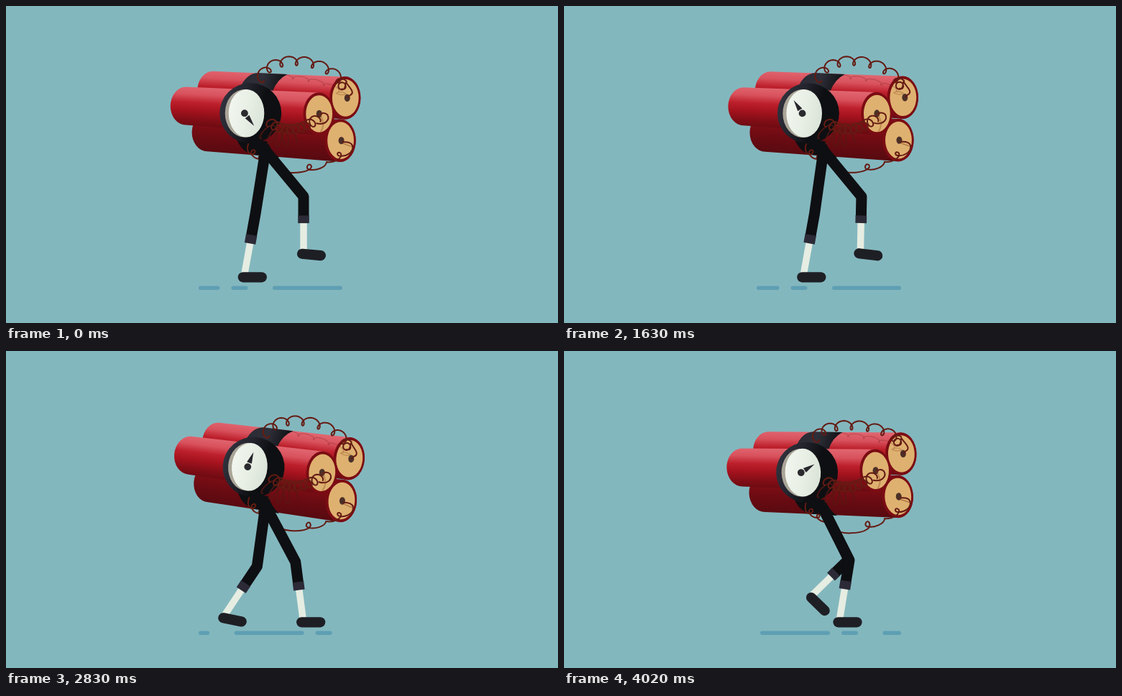
Recreate the animation shown at these times as an HTML page with a canvas. Size 768 by 441 pixels, loop 4120 ms.

```html
<!DOCTYPE html>
<html>
<head>
<meta charset="utf-8">
<title>Walking dynamite</title>
<style>
html, body { margin: 0; width: 100%; height: 100%; overflow: hidden; background: #83b7be; }
canvas { display: block; width: 768px; height: 441px; }
</style>
</head>
<body>
<canvas id="stage" width="768" height="441"></canvas>
<script>
const ctx = document.getElementById('stage').getContext('2d');
const TAU = Math.PI * 2;
const LOOP = 4120;
const WIRE = '#641b13';
const BLACK = '#0e0f12';

// drawing index, walk phase in steps, clock hand in degrees
const TIMING = [
  [0, 0, 143], [4, 1.082, 350], [8, 2.188, 542], [11, 2.988, 687],
  [16, 4.469, 947], [22, 6.158, 1256], [27, 7.575, 1498]
];

// leg phase, knee x y, heel x y, foot angle
const GAIT = [
  [0.29, 403, 293, 414, 377.3, 0],
  [0.469, 401, 296, 392.7, 377.3, 0],
  [0.575, 397, 291, 381.5, 377.3, 0],
  [0.8, 373, 287, 355, 377.3, 0],
  [1, 347, 289, 329.8, 377.3, 0],
  [1.082, 341, 290, 318.5, 377.3, 0],
  [1.158, 338, 291, 311, 377.3, 0],
  [1.188, 336, 292, 307.3, 377.3, 0],
  [1.32, 350, 300, 302, 371, 12],
  [1.469, 377, 301, 324, 357.5, 26],
  [1.575, 396, 290, 344, 343, 44],
  [1.78, 413, 270, 383, 334, 38],
  [2, 414, 265, 412, 344.8, 5],
  [2.082, 409, 275, 416.3, 357, -15],
  [2.158, 405, 282, 417.3, 365.7, -17],
  [2.188, 403, 286, 417.8, 369.5, -17],
  [2.29, 403, 293, 414, 377.3, 0]
];

function sample(keys, at) {
  let i = 1;
  while (i < keys.length - 1 && keys[i][0] < at) i++;
  const a = keys[i - 1], b = keys[i];
  const mix = (at - a[0]) / (b[0] - a[0]);
  return a.slice(1).map((v, j) => v + (b[j + 1] - v) * mix);
}

const startOf = k => 150 * k - 10 * ((k >= 3) + (k >= 9) + (k >= 27));

function stepAt(ms) {
  let k = 27;
  while (startOf(k) > ms) k--;
  return k;
}

function stroke(color, width, points, cap = 'butt') {
  ctx.strokeStyle = color;
  ctx.lineWidth = width;
  ctx.lineCap = cap;
  ctx.lineJoin = 'round';
  ctx.beginPath();
  points.forEach(([x, y]) => ctx.lineTo(x, y));
  ctx.stroke();
}

function curve(d, color = WIRE, width = 2) {
  ctx.strokeStyle = color;
  ctx.lineWidth = width;
  ctx.lineCap = 'round';
  ctx.stroke(new Path2D(d));
}

function oval(x, y, rx, ry, fill) {
  ctx.fillStyle = fill;
  ctx.beginPath();
  ctx.ellipse(x, y, rx, ry, 0, 0, TAU);
  ctx.fill();
}

function linear(x0, y0, x1, y1, ...stops) {
  const g = ctx.createLinearGradient(x0, y0, x1, y1);
  stops.forEach((c, i) => g.addColorStop(i / (stops.length - 1), c));
  return g;
}

// Curly wire: a looping trochoid carried along a cubic curve.
function coil(p, turns, along, across, color = WIRE, width = 2) {
  const points = [];
  const count = Math.ceil(turns * 28);
  for (let i = 0; i <= count; i++) {
    const t = i / count, s = 1 - t;
    const pos = j => s * s * s * p[j] + 3 * s * s * t * p[j + 2] + 3 * s * t * t * p[j + 4] + t * t * t * p[j + 6];
    const vel = j => s * s * (p[j + 2] - p[j]) + 2 * s * t * (p[j + 4] - p[j + 2]) + t * t * (p[j + 6] - p[j + 4]);
    const len = Math.hypot(vel(0), vel(1));
    const dx = vel(0) / len, dy = vel(1) / len;
    const a = t * turns * TAU + Math.PI * 0.9;
    const u = along * Math.sin(a), v = across * Math.cos(a);
    points.push([pos(0) + dx * u + dy * v, pos(1) + dy * u - dx * v]);
  }
  stroke(color, width, points, 'round');
}

function ground(phase) {
  const period = 170.5;
  const first = 371 - (phase % 1) * period;
  for (let n = -2; n < 3; n++) {
    for (const [shift, length] of [[0, 97], [113, 23]]) {
      const x = first + n * period + shift;
      const from = Math.max(268, x), to = Math.min(469, x + length);
      if (to - from > 3) stroke('#5f9fb3', 5.4, [[from + 2.7, 392.2], [to - 2.7, 392.2]], 'round');
    }
  }
}

function leg(phase, bob) {
  const u = (((phase - 0.29) % 2) + 2) % 2 + 0.29;
  const [kx, ky, hx, hy, angle] = sample(GAIT, u);
  const ax = hx + 2, ay = hy - 4;
  const shin = r => [kx + (ax - kx) * r, ky + (ay - ky) * r];
  stroke('#e6ede2', 9.5, [shin(0.47), [ax, ay]]);
  stroke(BLACK, 15, [[361, 201 + bob], [kx, ky], shin(0.37)]);
  stroke('#2b2a36', 15.6, [shin(0.35), shin(0.49)]);
  const turn = angle * TAU / 360;
  stroke('#1e1f25', 14.2, [[hx, hy], [hx + 26 * Math.cos(turn), hy + 26 * Math.sin(turn)]], 'round');
}

function barrel(lx, ly, fx, fy, hole, colors) {
  const mx = (lx + fx) / 2, my = (ly + fy) / 2;
  ctx.fillStyle = linear(mx + 1.5, my - 28, mx - 1.5, my + 28, ...colors);
  ctx.beginPath();
  ctx.ellipse(lx, ly, 21.5, 26.5, 0, Math.PI / 2, Math.PI * 1.5);
  ctx.ellipse(fx, fy, 21.5, 29.5, 0, -Math.PI / 2, Math.PI / 2);
  ctx.fill();
  oval(fx, fy, 21.7, 29.8, '#7b0c13');
  oval(fx + 0.5, fy, 18.4, 25.8, '#dfb170');
  oval(fx + hole, fy, 4, 5.2, '#4a3028');
}

function clock(angle) {
  oval(340, 149.2, 43, 42, linear(300, 130, 378, 158, '#31323d', '#23242d', BLACK, BLACK));
  oval(331.5, 149.3, 27, 33.3, '#aaa598');
  oval(334.3, 149.3, 24.8, 33.3, linear(310, 140, 359, 150, '#f1f6ee', '#e8efe5', '#dbe4d9'));
  oval(331.7, 149.3, 4.9, 4.9, '#2a2a2f');
  ctx.save();
  ctx.translate(331.7, 149.3);
  ctx.rotate(angle * TAU / 360);
  ctx.fillStyle = '#26262b';
  ctx.beginPath();
  ctx.moveTo(-3.6, -6);
  ctx.lineTo(3.6, -6);
  ctx.lineTo(0, -22);
  ctx.fill();
  ctx.restore();
}

function inBody(bob, tilt, paint) {
  ctx.save();
  ctx.translate(362, 210 + bob);
  ctx.rotate(tilt * TAU / 360);
  ctx.translate(-362, -210);
  paint();
  ctx.restore();
}

function bundle() {
  const reds = ['#e0656f', '#d8525d', '#bd202c', '#a5131e', '#850e17', '#6b0b12'];
  barrel(287.5, 117.5, 471.5, 127.5, 3, reds);
  coil([376, 98, 405, 98, 435, 103, 462, 116], 4, 5, 2.5, 'rgba(110,25,25,.28)', 1.3);
  barrel(280, 176, 465, 186.8, 1.5, ['#8a0f18', '#7c0d15', '#680b12', '#580a10']);
  ctx.fillStyle = linear(330, 95, 382, 108, '#2a2b34', '#2e2f38', '#15161b');
  ctx.fill(new Path2D('M326 113Q334 94 350 93L391 95Q377 102 371 118Z'));
  barrel(250, 139.5, 435, 149.7, 0.5, reds);
  ctx.fillStyle = BLACK;
  ctx.fill(new Path2D('M321 186Q329 205 346 207L368 209L380 211Q368 202 364 188Z'));
}

function wires(lift) {
  const up = lift * 4 / 3;
  coil([352, 104, 366, 61 - up, 450, 73 - up, 469, 109], 6.5, 6, 6.4);
  curve('M467 115C475 117 473 107 468 106C461 106 460 114 466 116C474 117 471 104 473 106C476 112 487 120 478 124L475 127');
  curve('M459 121Q466 117 473 122Q466 125 459 121', 'rgba(130,65,30,.35)', 1.3);
  coil([362, 174, 372, 183, 386, 186, 397, 180], 4, 6, 13, 'rgba(89,23,18,.75)', 2);
  coil([367, 162, 385, 176, 412, 174, 432, 157], 9, 5.5, 6.5);
  curve('M432 163C444 166 451 158 447 151C443 147 438 149 436 151');
  curve('M436 150Q445 164 438 174', 'rgba(130,65,30,.35)', 2);
}

function lowerWire(lift) {
  const y = 232 - lift * 0.4;
  curve('M337 192C334 202 338 208 344 206C350 202 344 197 341 203C342 211 350 214 355 212C358 207 350 206 352 213Q358 219 364 219');
  curve(`M371 215C365 220 374 ${y} 398 ${y}C420 ${y} 428 ${y - 7} 424 221C420 218 417 225 421 227C431 230 445 224 446 217`);
  curve('M446 217C458 218 468 211 466 205C462 201 459 206 463 208C472 210 484 204 482 194Q480 188 468 189');
  curve('M469 191L480 195', 'rgba(130,65,30,.5)', 1.5);
}

function draw(ms) {
  const [phase, hand] = sample(TIMING, stepAt(ms));
  const bob = 10 * (1 - Math.cos(TAU * phase));
  const tilt = 0.2 + 4.4 * Math.sin(TAU * phase);
  const lift = 5 * Math.cos(TAU * (phase - 0.08)) - 4;

  ctx.fillStyle = '#83b7be';
  ctx.fillRect(0, 0, 768, 441);
  ground(phase);
  inBody(bob, tilt, () => {
    bundle();
    lowerWire(lift);
  });
  leg(phase, bob);
  leg(phase + 1, bob);
  inBody(bob, tilt, () => {
    clock(hand - tilt);
    wires(lift);
  });
}

const begin = performance.now();
function tick() {
  draw((performance.now() - begin) % LOOP);
  requestAnimationFrame(tick);
}
tick();
</script>
</body>
</html>
```
